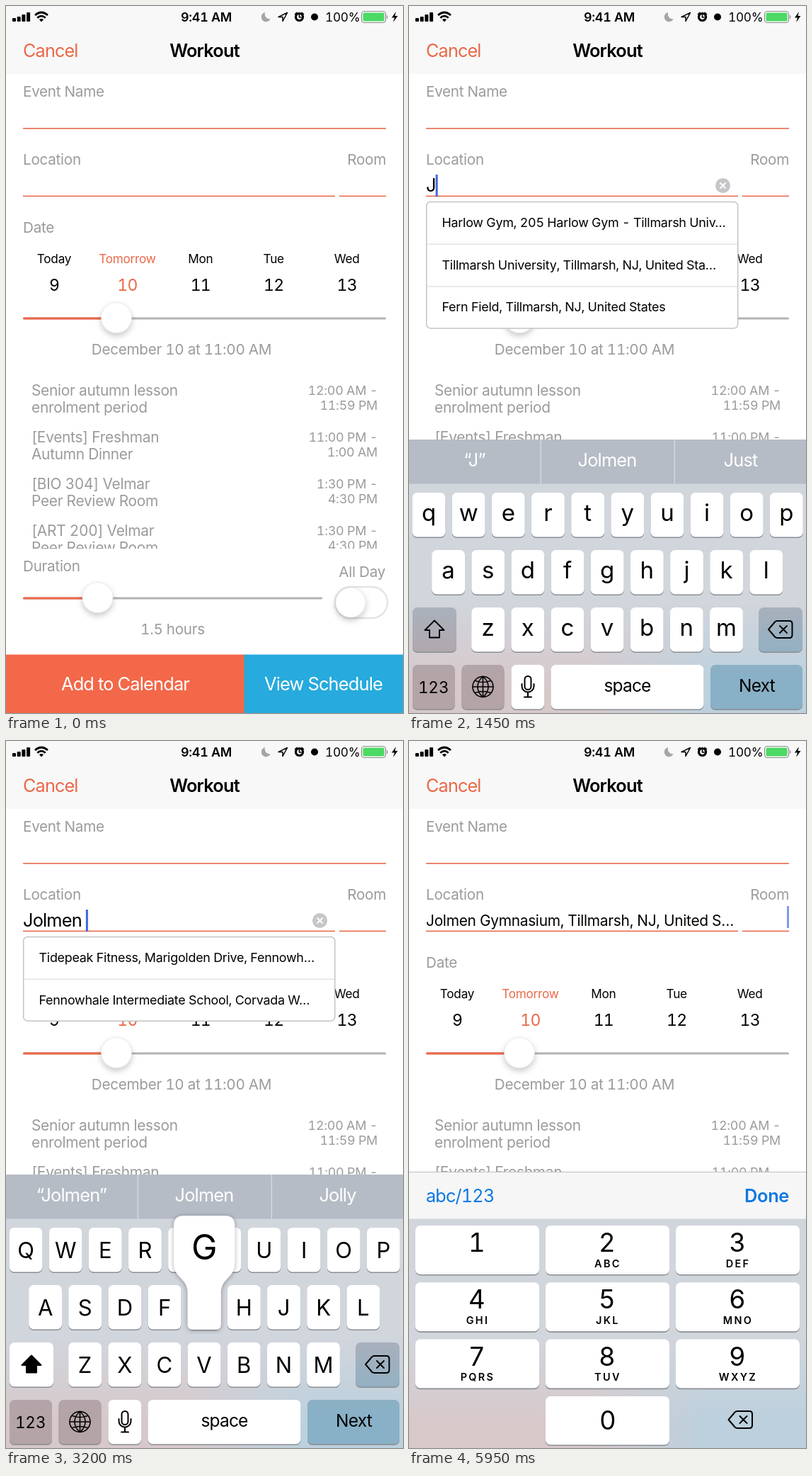
An HTML page for the animation above (6 s loop, 561x998 px).

```html
<!DOCTYPE html>
<html lang="en">
<head>
<meta charset="utf-8">
<title>Workout event form</title>
<style>
  html, body { margin: 0; width: 100%; height: 100%; overflow: hidden; background: #fff; }
  svg { display: block; width: 100%; height: 100%; }
  text {
    font-family: Inter, Roboto, "Liberation Sans", sans-serif; font-variant-numeric: tabular-nums;
    letter-spacing: -.014em; white-space: pre;
  }
  .mid { text-anchor: middle; }
  .end { text-anchor: end; }
  .big { letter-spacing: -.033em; }
  .bold { font-weight: 600; }
  .grey { fill: #9b9b9b; }
  .orange { fill: #ea6848; }
  .white { fill: #fff; }
  .blue { fill: #0b78e3; }
  .line { fill: none; stroke: #000; stroke-width: 2; stroke-linejoin: round; stroke-linecap: round; }
  .cap { letter-spacing: 0; }
  .caps { letter-spacing: .16em; font-weight: 600; }
</style>
</head>
<body>
<svg viewBox="0 0 561 998" xmlns="http://www.w3.org/2000/svg">
  <defs>
    <filter id="soft" x="-50%" y="-50%" width="200%" height="200%">
      <feDropShadow dx="0" dy="4" stdDeviation="4" flood-opacity=".22"/>
    </filter>
    <filter id="lift" x="-30%" y="-20%" width="160%" height="140%">
      <feDropShadow dx="0" dy="1" stdDeviation="3" flood-opacity=".35"/>
    </filter>
    <clipPath id="listClip"><rect y="520" width="561" height="246"/></clipPath>
    <linearGradient id="split">
      <stop offset=".45" stop-color="#d7c8ca"/><stop offset=".74" stop-color="#bcd0dd"/>
    </linearGradient>
    <linearGradient id="fade" class="fixed" gradientUnits="userSpaceOnUse" x1="0" x2="0" y1="845" y2="960">
      <stop stop-color="#fff" stop-opacity="0"/><stop offset="1" stop-color="#fff"/>
    </linearGradient>
    <linearGradient id="darkLeft" class="fixed" gradientUnits="userSpaceOnUse" x1="0" x2="0" y1="850" y2="945">
      <stop stop-color="#aab1bc"/><stop offset="1" stop-color="#b4a3a7"/>
    </linearGradient>
    <linearGradient id="darkRight" class="fixed" gradientUnits="userSpaceOnUse" x1="0" x2="0" y1="850" y2="945">
      <stop stop-color="#a8b0bc"/><stop offset="1" stop-color="#88b0c6"/>
    </linearGradient>
    <mask id="low" maskUnits="userSpaceOnUse" x="0" y="600" width="561" height="400">
      <rect y="600" width="561" height="400" fill="url(#fade)"/>
    </mask>
  </defs>
  <g id="page"></g>
  <g id="field"></g>
  <g id="board">
    <rect y="640" width="561" height="358" fill="#d1d5dc"/>
    <rect y="640" width="561" height="358" fill="url(#split)" mask="url(#low)"/>
    <g id="keys"></g>
  </g>
  <rect id="caret" width="3" height="31" fill="#3f66e0"/>
</svg>
<script>
const LOOP = 6000, FOCUS = 200, TAP = 5150, ROOM = 5400, SHIFT = 3000;
const ROWS = ['qwertyuiop', 'asdfghjkl', 'zxcvbnm'];
const START = [28, 55.6, 111.6], STEP = 56.15;
const STROKES = [['J', 1200], ['o', 1650], ['l', 1900], ['m', 2150], ['e', 2400], ['n', 2570], [' ', 2850], ['G', 3250]];
const HINTS = [
  [0, 'A', 'Yeah', 'Hey'],
  [1250, '“J”', 'Jolmen', 'Just'],
  [1750, '“Jo”', 'Job', 'Join'],
  [2000, '“Jol”', 'Jolly', 'Jolt'],
  [2250, '“Jolm”', 'Kale', 'Jolmen'],
  [2650, '“Jolmen”', 'Jolmen', 'Jolly'],
  [3300, '“G”', 'Good', 'Get']
];
const PLACES = [
  [0, 'Harlow Gym, 205 Harlow Gym - Tillmarsh Univ…', 'Tillmarsh University, Tillmarsh, NJ, United Sta…', 'Fern Field, Tillmarsh, NJ, United States'],
  [1950, 'Tidepeak Fitness, Marigolden Drive, Fennowh…', 'Fennowhale Intermediate School, Corvada W…'],
  [3500, 'Jolmen Gymnasium, Tillmarsh, NJ, United St…', 'Jolmen Street, Velmoore, PA, United States', 'Jolmen Street, Willet Hollow, NY, United Stat…']
];
const CHOSEN = 'Jolmen Gymnasium, Tillmarsh, NJ, United S…';

const $ = id => document.getElementById(id);
const text = (x, y, s, size, cls = '') => `<text x="${x}" y="${y}" font-size="${size}" class="${cls}">${s}</text>`;
const rect = (x, y, w, h, fill, r = 0, more = '') =>
  `<rect x="${x}" y="${y}" width="${w}" height="${h}" rx="${r}" fill="${fill}" ${more}/>`;
const circle = (x, y, r, fill, more = '') => `<circle cx="${x}" cy="${y}" r="${r}" fill="${fill}" ${more}/>`;
const path = (d, more = 'class="line"') => `<path d="${d}" ${more}/>`;
const key = (x, y, w, h, fill = '#fff') => rect(x, y + 1.6, w, h, '#8a8d93', 7) + rect(x, y, w, h, fill, 7);
const latest = (list, t) => list.filter(e => e[0] <= t).pop();

function statusBar() {
  const bars = [5, 7, 10, 13].map((h, i) => rect(9 + i * 6.7, 22 - h, 5, h, '#000', 1)).join('');
  const wifi = path('M41 13Q50 5 59 13M44.3 16.7Q50 11.5 55.7 16.7', 'fill="none" stroke="#000" stroke-width="2.8"')
    + path('M47 19.3Q50 16.6 53 19.3L50 22.4z', '');
  const moon = path('M366 9A6.7 6.7 0 1 0 373.5 18.5A7.5 7.5 0 0 1 366 9z', 'fill="#a5a5a8"');
  const arrow = path('M397.5 9.5L385 15.4H391V21.5z', 'fill="none" stroke="#000" stroke-width="1.5" stroke-linejoin="round"');
  const alarm = circle(414.5, 15.5, 5, 'none', 'stroke="#000" stroke-width="3.2"')
    + path('M408.5 11.5L411 9.3M420.5 11.5L418 9.3M414.5 12.5V16H417', 'class="line" style="stroke-width:1.6"');
  const battery = rect(502.5, 7.5, 34, 16, 'none', 4, 'stroke="#8d8d8d" stroke-width="1.2"')
    + rect(504.5, 9.5, 30, 12, '#4cd964', 2) + path('M538 12.5Q541 15.5 538 18.5z', 'fill="#8d8d8d"');
  const bolt = path('M551 8L545 16.5H549L547 23L553.5 14H549.5z', '');
  return bars + wifi + text(283, 22, '9:41 AM', 17.9, 'mid bold') + moon + arrow + alarm
    + circle(436, 15.5, 5, '#000') + text(451, 22, '100%', 17.2) + battery + bolt;
}

function slider(y, end, knob) {
  return rect(24, y - 1.5, end - 24, 3, '#b3b3b3', 1.5) + rect(24, y - 1.5, knob - 24, 3, '#ef6747', 1.5)
    + circle(knob, y - 1, 21.5, '#fff', 'filter="url(#soft)" stroke="#ddd" stroke-width=".6"');
}

function page() {
  const days = ['Today', 'Tomorrow', 'Mon', 'Tue', 'Wed'].map((d, i) => {
    const x = 68 + i * 103.4, cls = 'mid' + (i == 1 ? ' orange' : '');
    return text(x, 363, d, 17.2, cls) + text(x, 402, 9 + i, 23, cls + ' big');
  }).join('');
  const list = [
    ['Senior autumn lesson', 'enrolment period', '12:00 AM -', '11:59 PM'],
    ['[Events] Freshman', 'Autumn Dinner', '11:00 PM -', '1:00 AM'],
    ['[BIO 304] Velmar', 'Peer Review Room', '1:30 PM -', '4:30 PM'],
    ['[ART 200] Velmar', 'Peer Review Room', '1:30 PM -', '4:30 PM']
  ].map(([a, b, from, to], i) => {
    const y = 549.5 + i * 66;
    return text(36, y, a, 20.9, 'grey') + text(36, y + 24.5, b, 20.9, 'grey')
      + text(525, y - .5, from, 17.9, 'grey end') + text(525, y + 20.5, to, 17.9, 'grey end');
  }).join('');
  const rule = (x, y, w) => rect(x, y, w, 1.6, '#e8694b');
  return rect(0, 0, 561, 96, '#f8f8f8') + statusBar()
    + text(24, 72, 'Cancel', 25.2, 'orange big') + text(280.5, 72, 'Workout', 25.4, 'mid bold big')
    + text(24, 128, 'Event Name', 20.7, 'grey') + rule(24, 172, 513)
    + text(24, 224, 'Location', 20.7, 'grey') + text(537, 224, 'Room', 20.7, 'grey end')
    + rule(24, 267.6, 441) + rule(471, 267.6, 66)
    + text(24, 320, 'Date', 20.7, 'grey') + days + slider(441, 537, 156)
    + text(248, 492, 'December 10 at 11:00 AM', 20.7, 'grey mid')
    + `<g clip-path="url(#listClip)">${list}</g>`
    + text(24, 798, 'Duration', 20.7, 'grey') + text(536, 806, 'All Day', 20.7, 'grey end')
    + slider(836, 447, 129.5) + text(235.5, 887, '1.5 hours', 20.7, 'grey mid')
    + rect(465, 820, 74, 44, '#fff', 22, 'stroke="#e4e4e4" stroke-width="2.5"')
    + circle(487, 842, 21, '#fff', 'filter="url(#soft)" stroke="#ddd" stroke-width=".6"')
    + rect(0, 915.5, 337, 82.5, '#f36849') + rect(336.5, 915.5, 224.5, 82.5, '#27aadd')
    + text(168.5, 966, 'Add to Calendar', 25.4, 'white mid big') + text(448.5, 966, 'View Schedule', 25.4, 'white mid big');
}

function field(typed, places, tapped, done) {
  if (done) return text(24, 261, CHOSEN, 20.9);
  const h = places.length * 59.7 - .8;
  const rows = places.map((p, i) => {
    const y = 276.5 + i * 59.7;
    return (tapped && !i ? rect(25.4, y + .8, 438.6, 58, '#d9d9d9', 4) : '')
      + (i ? rect(25, y - .6, 439, 1.2, '#dcdcdc') : '') + text(46.5, y + 35.5, p, 17.9);
  }).join('');
  const clear = typed ? circle(443.5, 253.5, 10.5, '#c6c6ca')
    + path('M439.5 249.5l8 8m0-8l-8 8', 'stroke="#fff" stroke-width="2"') : '';
  return `<text id="typed" x="24" y="262" font-size="25.4" class="big">${typed}</text>` + clear
    + rect(24.7, 276.6, 440, h, '#fff', 5.5, 'stroke="#c3c3c3" stroke-width="1.5"') + rows;
}

const eraser = (x, y) => path(`M${x - 17} ${y}l9-10.5q1.5-1.5 3.5-1.5h17q4 0 4 4v16q0 4-4 4h-17q-2 0-3.5-1.5zM${x - 1} ${y - 5}l10 10m0-10l-10 10`);

function hintBar(hints) {
  const marked = hints[1] == 'Kale';
  let out = rect(0, 612, 561, 62.5, '#b6bcc6');
  out += marked ? rect(186, 612, 189.5, 62.5, '#ebeef0')
    : rect(185.6, 612, 1.2, 62.5, '#dadde2') + rect(374.6, 612, 1.2, 62.5, '#dadde2');
  hints.forEach((h, i) => {
    const first = h == 'A';
    out += text(first ? 83 : [92.5, 280, 468.5][i], 650, h, 25.4, 'mid big ' + (marked && i == 1 ? 'blue' : 'white'));
    if (first) out += rect(108.5, 631, 23, 23, 'none', 2, 'stroke="#fff" stroke-width="2.6"') + text(120, 650, '?', 20, 'mid white bold');
  });
  return out;
}

function popup(x, y, ch) {
  const d = `M${x - 43} ${y - 84}q0-14 14-14h58q14 0 14 14v52c0 24-19.5 20-19.5 44v44q0 7-7 7h-33q-7 0-7-7v-44c0-24-19.5-20-19.5-44z`;
  return path(d, 'fill="#fff" filter="url(#lift)"') + text(x, y - 36, ch, 49, 'mid cap');
}

function letters(hints, upper, pressed) {
  let out = hintBar(hints), top = '';
  ROWS.forEach((row, r) => [...row].forEach((c, i) => {
    const x = START[r] + i * STEP, y = 687 + r * 81, ch = upper ? c.toUpperCase() : c;
    out += key(x - 23.4, y, 46.8, 62.5) + text(x, y + (upper ? 43 : 40), ch, upper ? 31 : 33, 'mid cap');
    if (pressed == ch) top = popup(x, y, ch);
  }));
  out += key(5, 849, 62, 62.5, upper ? '#fff' : 'url(#darkLeft)')
    + path('M36 867.5L49.5 881H43V891.5H29V881H22.5z', `class="line" style="fill:${upper ? '#000' : 'none'}"`)
    + key(494, 849, 62, 62.5, 'url(#darkRight)') + eraser(525, 880)
    + key(5, 930, 60, 62.5, 'url(#darkLeft)') + text(34.5, 969.5, '123', 22.5, 'mid')
    + key(74.5, 930, 60, 62.5, 'url(#darkLeft)')
    + path('M90 961a14.5 14.5 0 1 0 29 0a14.5 14.5 0 1 0-29 0zM104.5 946.5v29M90 961h29M104.5 946.5c-10 8-10 21 0 29c10-8 10-21 0-29M93.5 952.5q11 4 22 0M93.5 969.5q11-4 22 0', 'class="line" style="stroke-width:1.6"')
    + key(144.5, 930, 46.5, 62.5)
    + rect(163.5, 946, 9, 19, 'none', 4.5, 'stroke="#000" stroke-width="2"') + path('M159.5 957v3a8.5 8.5 0 0 0 17 0v-3M168 969v6M163 975.5h10')
    + key(200.5, 930, 216, 62.5, pressed == ' ' ? '#b4b9c3' : '#fff') + text(308.5, 968, 'space', 24.5, 'mid big')
    + key(426, 930, 130, 62.5, 'url(#darkRight)') + text(491.5, 968, 'Next', 24.5, 'mid big');
  return out + top;
}

function numbers() {
  const subs = ['', 'ABC', 'DEF', 'GHI', 'JKL', 'MNO', 'PQRS', 'TUV', 'WXYZ'];
  const pad = subs.map((s, i) => {
    const x = 9 + i % 3 * 184, y = 684 + Math.floor(i / 3) * 80.3;
    return key(x, y, 175, 69) + text(x + 86.5, y + 37, i + 1, 36.5, 'mid') + text(x + 88, y + 58.5, s, 14.5, 'mid caps');
  }).join('');
  return rect(0, 608, 561, 66.5, '#f6f6f6') + rect(0, 608, 561, 1, '#bfbfc3')
    + text(24, 651, 'abc/123', 25.2, 'blue big') + text(537, 651, 'Done', 25.4, 'blue end bold')
    + pad + key(193, 925, 175, 68.5) + text(280.5, 971.5, 0, 36.5, 'mid') + eraser(468.5, 958);
}

const shown = {};
function show(id, html) {
  if (shown[id] !== html) $(id).innerHTML = shown[id] = html;
}

// Solid for half a second, then a soft blink each second
function blink(ms) {
  const p = ms / 1000 % 1;
  if (p < .5) return 1;
  if (p < .65) return 1 - (p - .5) / .15;
  return Math.max(0, (p - .93) / .07);
}

function draw(t) {
  const open = t >= FOCUS, room = t >= ROOM;
  const done = STROKES.filter(s => s[1] <= t);
  const next = STROKES.find(s => t < s[1] && t >= s[1] - 95);
  const typed = done.map(s => s[0]).join('').replace(' ', '\u00a0');
  const upper = t < STROKES[0][1] || (t >= SHIFT && t < STROKES[7][1]);

  show('field', open ? field(typed, latest(PLACES, t).slice(1), t >= TAP, room) : '');
  show('keys', room ? numbers() : letters(latest(HINTS, t).slice(1), upper, next && next[0]));

  // Critically damped slide of the keyboard, on whole pixels
  const k = Math.max(0, t - FOCUS) * .0193;
  const drop = Math.round(386 * (1 + k) * Math.exp(-k));
  $('board').setAttribute('transform', `translate(0 ${drop})`);
  document.querySelectorAll('.fixed').forEach(g => g.setAttribute('gradientTransform', `translate(0 ${-drop})`));

  const since = room ? ROOM : Math.max(FOCUS, ...done.map(s => s[1]));
  const caret = $('caret');
  caret.setAttribute('x', room ? 534 : 24 + (typed && open ? $('typed').getComputedTextLength() : 0));
  caret.setAttribute('y', room ? 233 : 238);
  caret.setAttribute('opacity', open ? blink(t - since) : 0);
}

show('page', page());
function tick() {
  draw(performance.now() % LOOP);
  requestAnimationFrame(tick);
}
tick();
</script>
</body>
</html>
```
